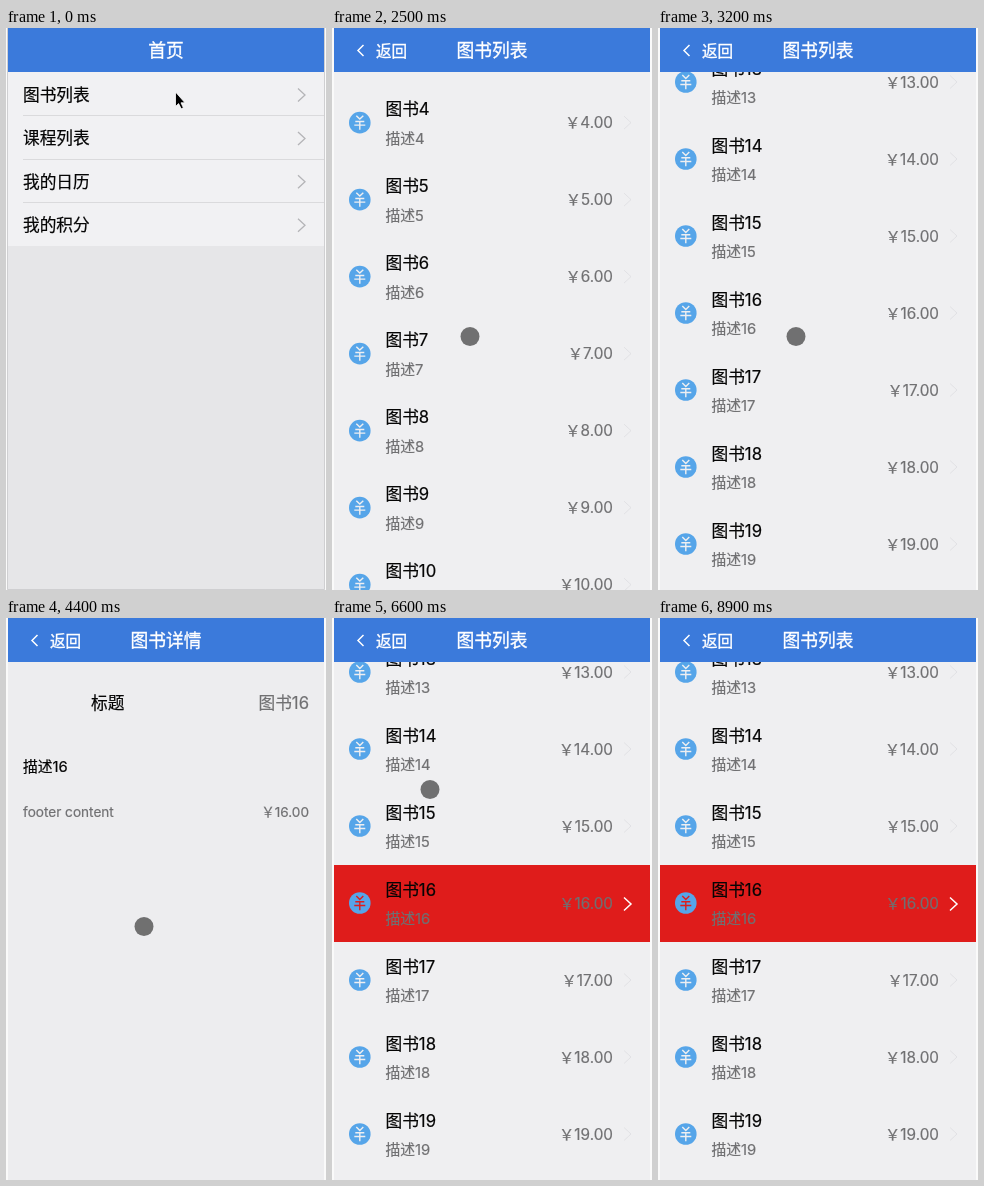
Write an HTML page that moves like this. It is 320 px wide and 562 px high and loops after 9000 ms.

```html
<!DOCTYPE html>
<html lang="zh-CN">
<head>
<meta charset="utf-8">
<style>
html, body { margin: 0; width: 100%; height: 100%; overflow: hidden; background: #fafafa; }
svg { display: block; width: 320px; height: 562px; }
text { font-family: Inter, "Noto Sans CJK SC", "Noto Sans CJK", sans-serif; font-size: 16.7px; fill: #050505; stroke: #050505; stroke-width: .2; }
.grey { fill: #707072; stroke: #707072; }
.white { fill: #fff; stroke: #fff; stroke-width: .35; font-weight: 500; }
.end { text-anchor: end; }
.mid { text-anchor: middle; }
path { fill: none; }
</style>
</head>
<body>
<svg viewBox="0 0 320 562">
  <g id="home"></g>
  <g id="list"><rect x="2" width="316" height="562" fill="#efeff1"/><g id="rows"></g></g>
  <g id="detail">
    <rect x="2" width="316" height="562" fill="#ededef"/>
    <text x="85" y="91">标题</text>
    <text x="303" y="91" class="grey end">图书16</text>
    <text x="17" y="154" style="font-size:14.8px">描述16</text>
    <text x="17" y="198.5" class="grey" style="font-size:13.6px">footer content</text>
    <text x="303" y="198.5" class="grey end" style="font-size:13.6px">￥16.00</text>
  </g>
  <rect x="2" width="316" height="44" fill="#3b7adb"/>
  <text id="title" x="160" y="29" class="white mid" style="font-size:17.8px"></text>
  <g id="back">
    <path d="M31.5 17L26 22.5L31.5 28" stroke="#fff" stroke-width="1.5"/>
    <text x="44" y="28.5" class="white" style="font-size:15.6px">返回</text>
  </g>
  <path id="arrow" d="M169.5 64V78.5L172.6 75.6L175.2 80.8L177.4 79.8L175 74.8H179Z" style="fill:#000" stroke="#fff" stroke-width=".8"/>
  <circle id="touch"/>
</svg>
<script>
const $ = id => document.getElementById(id);
const LOOP = 9000, STEP = 77, SCROLL = 953, PICKED = 16;

const chevron = (y, colour, width) =>
  `<path d="M292 ${y - 6.5}L299 ${y}L292 ${y + 6.5}" stroke="${colour}" stroke-width="${width}"/>`;

$('home').innerHTML = `<rect x="1" width="318" height="562" fill="#e6e6e8"/>
  <rect x="1" y="44" width="318" height="174" fill="#f1f1f3"/>
  <path d="M1.5 0V561.5H318.5V0" stroke="#cfcfd1"/>` +
  ['图书列表', '课程列表', '我的日历', '我的积分'].map((name, i) => {
    const y = 67 + i * 43.4;
    return `<text x="17" y="${y + 5.8}">${name}</text>` + chevron(y, '#b4b4b7', 1.3) +
      (i < 3 ? `<path d="M17 ${Math.floor(y + 20.7) + .5}H318" stroke="#dadadc"/>` : '');
  }).join('');

function row(n, picked) {
  const y = 83 + (n - 1) * STEP, back = picked ? '#df1c1b' : '#efeff1';
  return `<rect x="2" y="${y - 38}" width="316" height="${STEP}" fill="${back}"/>
    <circle cx="27.8" cy="${y}" r="10.8" fill="#56a5e9"/>
    <path transform="translate(27.8 ${y})" d="M-3.5-7L0-3.6L3.5-7M-4.5-1.2H4.5M-5.5 2.5H5.5M0-1.2V7.2" stroke="${back}" stroke-width="1.4"/>
    <text x="53.5" y="${y - 7.5}">图书${n}</text>
    <text x="53.5" y="${y + 21}" class="grey" style="font-size:14.8px">描述${n}</text>
    <text x="281" y="${y + 5.8}" class="grey end" style="font-size:15.3px">￥${n}.00</text>` +
    (picked ? chevron(y + 1, '#fff', 1.5) : chevron(y, '#dedee1', .8));
}

function fillRows(picked) {
  $('rows').innerHTML = Array.from({ length: 20 }, (_, i) => row(i + 1, i + 1 === picked)).join('');
}

// pointer stops: time, x, y
const stops = [
  [0, 170.5, 65.5], [1600, 170.5, 65.5], [2000, 138, 308.5], [4500, 138, 308.5], [5200, 55.5, 22],
  [6200, 55.5, 22], [7000, 140.5, 321], [7300, 140.5, 321], [7900, 264, 480], [8400, 264, 575], [LOOP, 264, 575]
];
const presses = [[900, 1100], [4200, 4400], [5500, 6100], [7100, 7400]];

function pointerAt(t) {
  const i = stops.findIndex(s => s[0] > t);
  const [t0, x0, y0] = stops[i - 1], [t1, x1, y1] = stops[i];
  const p = (t - t0) / (t1 - t0), e = p * p * (3 - 2 * p);
  return [x0 + (x1 - x0) * e, y0 + (y1 - y0) * e];
}

const show = (id, on) => $(id).style.display = on ? '' : 'none';

let marked;
function draw(t) {
  const page = t < 1100 ? 'home' : t >= 4400 && t < 6100 ? 'detail' : 'list';
  for (const id of ['home', 'list', 'detail']) show(id, id === page);
  show('back', page !== 'home');
  $('title').textContent = { home: '首页', list: '图书列表', detail: '图书详情' }[page];

  const picked = t >= 6100 ? PICKED : 0;
  if (picked !== marked) fillRows(marked = picked);
  const p = Math.min(1, Math.max(0, (t - 2200) / 1000));
  $('rows').setAttribute('transform', `translate(0 ${-SCROLL * p ** 1.22})`);

  show('arrow', t < 800);
  show('touch', t >= 800);
  const [x, y] = pointerAt(t);
  const down = presses.some(([a, b]) => t >= a && t < b);
  const look = {
    cx: x, cy: y, r: 9.5,
    fill: down ? 'rgba(0,0,0,.58)' : 'rgba(0,0,0,.53)',
    stroke: down ? 'rgba(200,200,200,.45)' : 'none',
    'stroke-width': 1.5
  };
  for (const k in look) $('touch').setAttribute(k, look[k]);
}

const start = performance.now();
function tick() {
  const t = (performance.now() - start) % LOOP;
  draw(Math.floor(t / 100) * 100);
  requestAnimationFrame(tick);
}
tick();
</script>
</body>
</html>
```
